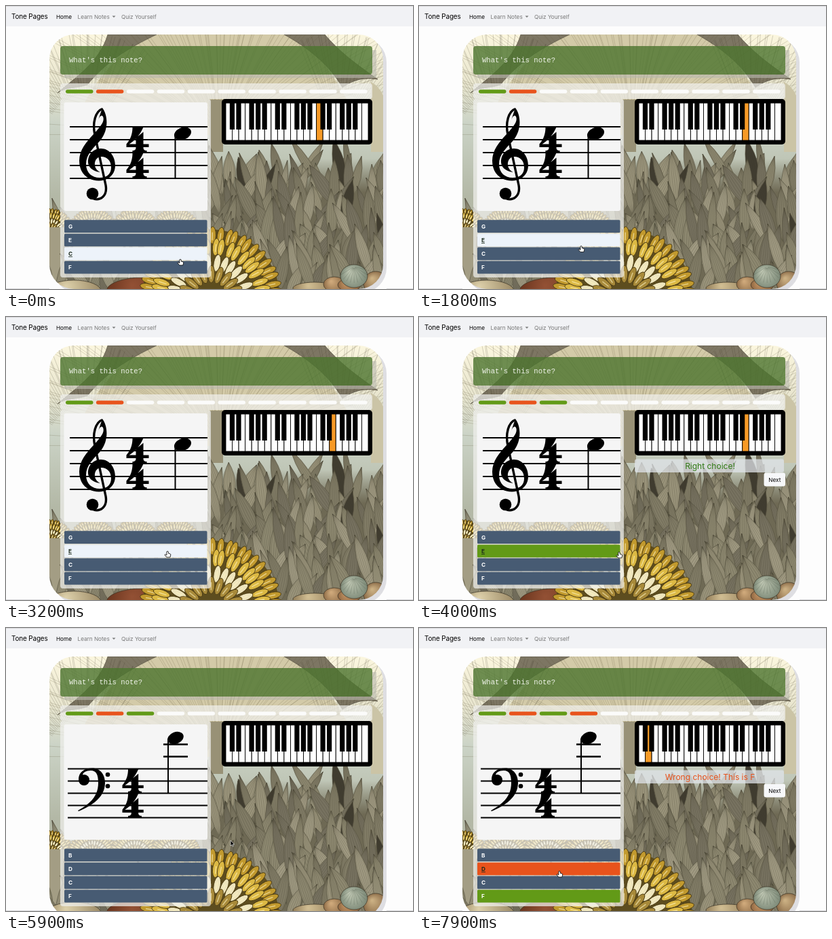
An HTML page with a canvas for the animation above (8 s loop, 600 px wide and 417 px high).

```html
<!DOCTYPE html>
<html lang="en">
<head>
<meta charset="utf-8">
<title>Note quiz</title>
<style>
  html, body { margin: 0; width: 100%; height: 100%; overflow: hidden; background: #fdfdfd; }
  #stage { position: absolute; left: 0; top: 0; width: 600px; height: 417px; overflow: hidden; }
  #card { position: absolute; left: 64px; top: 42px; width: 492px; border-radius: 36px; overflow: hidden; }
  #shade { position: absolute; left: 69px; top: 47px; width: 492px; border-radius: 36px; background: #dedee2; }
  #art { position: absolute; left: 0; top: 0; }
  svg { position: absolute; left: 0; top: 0; }
  text { font: 8.2px Inter, Roboto, sans-serif; }
  .brand { font-size: 9.9px; letter-spacing: -.12px; }
  .muted { fill: #777; }
  .prompt { font: 10.6px "Liberation Mono", monospace; fill: #eef2e8; }
  .verdict { font-size: 12px; text-anchor: middle; }
  .row text { font-weight: 700; fill: #fff; }
  .row.hover text { fill: #1c2a1c; text-decoration: underline; }
  .ink { fill: none; stroke: #000; }
</style>
</head>
<body>
<div id="stage">
  <div id="shade"></div>
  <div id="card"><canvas id="art" width="492" height="390"></canvas></div>
  <svg width="600" height="417" viewBox="0 0 600 417">
    <defs>
      <path id="four" d="M9 0H25C20 12 12 20 4 25H14V16L25 7V25H33V29.500H25C25 33 26 34.500 30 34.500V37.500H9V34.500C13 34.500 14 33 14 29.500H0V25C6 18 9 10 9 0Z"/>
    </defs>
    <rect width="600" height="30" fill="#f1f2f5"/>
    <path d="M0 .5H600M0 416.5H64M561 416.5H600" stroke="#d9d9dc"/>
    <text class="brand" x="8" y="19">Tone Pages</text>
    <text x="74" y="18.5">Home</text>
    <text class="muted" x="105.5" y="18.5">Learn Notes</text>
    <path class="muted" d="M156.500 14.500h5l-2.500 2.500z"/>
    <text class="muted" x="170" y="18.500">Quiz Yourself</text>

    <path d="M540 65H546V106H86V101H540Z" fill="#b9b9ae" fill-opacity=".6"/>
    <rect x="80" y="59" width="460" height="42" rx="4" fill="#4d752f" fill-opacity=".8"/>
    <text class="prompt" x="93" y="83">What's this note?</text>
    <rect x="80" y="114" width="460" height="23" rx="4" fill="#f1f1ee" fill-opacity=".7"/>
    <g id="bars"></g>

    <rect id="panel" x="80" y="137" width="222" height="263" rx="4" fill="#f0f0ee" fill-opacity=".72"/>
    <rect id="sheet" x="85.500" y="142" width="211.500" height="160" rx="3" fill="#f5f5f5"/>
    <g id="treble">
      <path class="ink" stroke-width="2" d="M94 178H297M94 197H297M94 216H297M94 235H297M94 254H297M249.500 188V254"/>
      <path d="M142 150C151 162 151 184 139 198C128 210 118 219 118 233C118 246 127 253 138 253C149 253 155 247 155 238C155 227 148 222 141 222C134 222 130 228 131 235C132 240 135 243 139 245C126 243 120 236 121 227C122 217 130 210 140 210C152 210 161 221 161 235C161 249 150 257.500 137 257.500C120 257.500 108 246 108 228C108 212 119 200 128 190C139 178 146 170 143 163C141 160 138 162 136 168Z"/>
      <path class="ink" stroke-width="3.400" d="M142 151.500C132 155 127 172 131 190L147 264C150 281 138 287 129 284"/>
      <circle cx="127.500" cy="276.500" r="8.800"/>
      <use href="#four" x="177.500" y="178.500"/><use href="#four" x="177.500" y="216.500"/>
      <ellipse cx="260.500" cy="188" rx="13" ry="9" transform="rotate(-22 260.500 188)"/>
    </g>
    <g id="bass">
      <path class="ink" stroke-width="2" d="M91 207.500H297M91 225.500H297M91 243.500H297M91 261.500H297M91 279.500H297M239 163V243"/>
      <path class="ink" stroke-width="2.600" d="M232 171.500H268M232 189.500H268"/>
      <path d="M107 223C107 212 116 206.500 127 206.500C139 206.500 146 216 146 228C146 250 126 262 107 270L106 269C124 259 136 248 136 228C136 216 133 210 125 210C118 210 113 213 113 217Z"/>
      <circle cx="115" cy="224" r="8"/><circle cx="150" cy="216" r="3.300"/><circle cx="150" cy="233" r="3.300"/>
      <g transform="translate(171.500 208) scale(.947)"><use href="#four"/><use href="#four" y="38"/></g>
      <ellipse cx="250" cy="162" rx="12.200" ry="8.600" transform="rotate(-22 250 162)"/>
    </g>
    <g id="rows"></g>

    <rect x="318" y="137" width="222" height="67" rx="5"/>
    <g id="keys"></g>
    <g id="result">
      <rect x="318" y="209.500" width="220" height="19.500" rx="3" fill="#e1e5ea" fill-opacity=".74"/>
      <text id="verdict" class="verdict" x="429" y="223.800"></text>
      <rect x="508.500" y="229.500" width="31.500" height="20" rx="3" fill="#f6f7f9"/>
      <text x="524.300" y="242.500" text-anchor="middle">Next</text>
    </g>
    <g id="pointer">
      <path id="hand" d="M-1.200 .8Q0-.6 1.200 .8V3.200L4 4Q5 4.400 4.600 6L3.800 9H-1.200L-4 5.800Q-4.200 4.400-2.600 5L-1.200 6Z" fill="#fff" stroke="#000" stroke-width=".8"/>
      <path id="arrow" d="M0 0V8L1.900 6.300L3.200 9L4.400 8.400L3.200 5.800H5.600Z" stroke="#fff" stroke-width=".6"/>
    </g>
  </svg>
</div>
<script>
const $ = id => document.getElementById(id);
const GREEN = '#629a17', RED = '#e8531c', SLATE = '#475b73', PALE = '#edf3fa';

/* ---- engraved garden behind the quiz ---- */
let seed = 41;
const rnd = (lo, hi) => {
  seed = (seed * 16807) % 2147483647;
  return lo + (hi - lo) * seed / 2147483647;
};
const pick = list => list[Math.floor(rnd(0, list.length))];
const ctx = $('art').getContext('2d');
ctx.translate(-64, -42);

function shape(d, fill, line) {
  const path = new Path2D(d);
  ctx.fillStyle = fill;
  ctx.fill(path);
  if (line) { ctx.strokeStyle = line; ctx.lineWidth = .6; ctx.stroke(path); }
}

function leaf(x, y, len, w, tilt, fill) {
  ctx.save();
  ctx.translate(x, y);
  ctx.rotate(tilt);
  shape(`M0 0Q${w} ${-len * .45} 0 ${-len}Q${-w} ${-len * .45} 0 0Z`, fill, '#55513f');
  ctx.lineWidth = .4;
  ctx.strokeStyle = 'rgba(60,56,42,.5)';
  ctx.beginPath();
  for (let k = -2; k <= 2; k++) {
    ctx.moveTo(0, -2);
    ctx.quadraticCurveTo(k * w * .38, -len * .45, 0, -len);
  }
  ctx.stroke();
  ctx.restore();
}

function veins(cx, cy, from, to, r0, r1, step, color) {
  ctx.strokeStyle = color;
  ctx.lineWidth = .5;
  ctx.beginPath();
  for (let a = from; a < to; a += step) {
    const bend = a + rnd(-.04, .04);
    ctx.moveTo(cx + r0 * Math.cos(a), cy + r0 * Math.sin(a));
    ctx.lineTo(cx + r1 * Math.cos(bend), cy + r1 * Math.sin(bend));
  }
  ctx.stroke();
}

function cornFan(cx, cy, radius) {
  ctx.beginPath();
  ctx.arc(cx, cy, radius * .96, 0, 7);
  ctx.fillStyle = '#5d4d1f';
  ctx.fill();
  const rings = [[.88, '#c29a2e'], [.72, '#dcb944'], [.5, '#eee5bd'], [.34, '#a88a3a']];
  for (const [at, fill] of rings) {
    for (let a = -3.1; a < .1; a += .105 / at) {
      ctx.save();
      ctx.translate(cx, cy);
      ctx.rotate(a + rnd(-.03, .03));
      ctx.beginPath();
      ctx.ellipse(radius * at, 0, radius * .12, radius * .047, 0, 0, 7);
      ctx.fillStyle = fill;
      ctx.fill();
      ctx.strokeStyle = '#4d3d14';
      ctx.lineWidth = .9;
      ctx.stroke();
      ctx.fillStyle = 'rgba(255,245,195,.6)';
      ctx.fillRect(radius * (at - .07), -1, radius * .11, 1.5);
      ctx.restore();
    }
  }
}

function ball(x, y, rx, ry, fill, glow) {
  const g = ctx.createRadialGradient(x - rx * .3, y - ry * .4, 1, x, y, rx);
  g.addColorStop(0, glow);
  g.addColorStop(1, fill);
  ctx.beginPath();
  ctx.ellipse(x, y, rx, ry, 0, 0, 7);
  ctx.fillStyle = g;
  ctx.fill();
  ctx.strokeStyle = '#3c3426';
  ctx.lineWidth = .7;
  ctx.stroke();
}

function paintGarden() {
  const sky = ctx.createLinearGradient(0, 42, 0, 280);
  [[0, '#fbf6de'], [.3, '#e9e6cf'], [.55, '#cbd3c6'], [1, '#b3b8a6']].forEach(s => sky.addColorStop(...s));
  ctx.fillStyle = sky;
  ctx.fillRect(64, 42, 492, 390);

  // great leaf with its two folded dark edges
  shape('M100 190C108 130 164 72 206 42H432C474 84 500 130 530 190Z', '#d3caa8');
  shape('M150 42H222C180 62 148 82 120 116C104 122 90 118 76 128C104 104 138 82 150 42Z', '#7d7663', '#4c4739');
  shape('M410 42H470C490 66 515 85 548 108C522 104 508 112 496 120C476 86 446 62 410 42Z', '#7d7663', '#4c4739');
  veins(315, 190, -3.1, -.05, 20, 300, .03, 'rgba(95,86,60,.42)');
  veins(120, 190, -2.6, -.9, 60, 150, .04, 'rgba(60,55,42,.4)');
  veins(490, 190, -2, -.6, 60, 150, .04, 'rgba(60,55,42,.4)');
  shape('M538 112Q550 118 556 132V215H538Z', '#cbc4a6');
  shape('M300 138H320V215H300Z', '#989176');

  // field of blades, back rows first
  const field = ctx.createLinearGradient(0, 225, 0, 275);
  field.addColorStop(0, 'rgba(110,105,84,0)');
  field.addColorStop(1, '#6e6954');
  ctx.fillStyle = field;
  ctx.fillRect(300, 225, 256, 207);
  const greys = ['#8d8870', '#9a947b', '#817c66', '#a09a82', '#777260'];
  const withShadow = [...greys, ...greys, '#403c30'];
  for (let row = 0; row < 9; row++) {
    for (let x = 292; x < 566; x += 15) {
      leaf(x + rnd(-7, 7), 268 + row * 20 + rnd(-9, 9), rnd(50, 88), rnd(10, 20), rnd(-.6, .6), pick(withShadow));
    }
  }

  // lower left, mostly veiled by the answers
  for (let x = 62; x < 302; x += 12) {
    leaf(x, 345 + rnd(-10, 6), rnd(40, 85), 10, rnd(-.5, .5), pick(['#b5b49c', '#c3c1a8', '#9d9a82']));
  }
  for (const x of [64, 128, 190, 250]) cornFan(x, 336, 38);
  ctx.fillStyle = '#a39d84';
  ctx.fillRect(64, 326, 238, 106);
  for (let x = 62; x < 302; x += 10) leaf(x, 430, rnd(50, 100), 14, rnd(-.7, .7), pick(greys));

  // harvest along the ground
  ball(100, 420, 40, 16, '#9c8a66', '#ddd0aa');
  ball(202, 420, 54, 20, '#6a351e', '#925034');
  ball(252, 416, 16, 12, '#777055', '#ded8bd');
  ball(278, 416, 18, 13, '#8a8268', '#e4dfc8');
  cornFan(302, 431, 106);
  ball(455, 416, 32, 9, '#937e59', '#d0bd92');
  ball(484, 410, 16, 11, '#8c6a45', '#cfa97b');
  ball(545, 408, 18, 17, '#8a6a47', '#cbb083');
  ball(506, 411, 17, 9, '#8d643f', '#c39565');
  ball(513, 398, 20, 17, '#7b8876', '#c0c8b4');
  veins(513, 384, .3, 2.8, 2, 24, .25, 'rgba(50,60,45,.4)');
}
paintGarden();

/* ---- quiz widgets ---- */
function add(parent, tag, attrs) {
  const el = document.createElementNS('http://www.w3.org/2000/svg', tag);
  for (const k in attrs) el.setAttribute(k, attrs[k]);
  return parent.appendChild(el);
}

const bars = Array.from({ length: 10 }, (_, i) =>
  add($('bars'), 'rect', { x: 88 + i * 44.9, y: 123.2, width: 40.5, height: 5.6, rx: 2.8 }));

const ROW_STEP = 20.15;
const rows = Array.from({ length: 4 }, (_, i) => {
  const g = add($('rows'), 'g', { class: 'row' });
  const y = 315.3 + i * ROW_STEP;
  return {
    g,
    box: add(g, 'rect', { x: 86, y, width: 210.5, height: 18.8, rx: 1.5 }),
    label: add(g, 'text', { x: 92, y: y + 12.6 })
  };
});

const KEY_W = 210 / 22;
const keys = Array.from({ length: 22 }, (_, i) =>
  add($('keys'), 'rect', { x: 324 + i * KEY_W, y: 143, width: KEY_W, height: 55, stroke: '#000', 'stroke-width': .9 }));
for (let i = 0; i < 21; i++) {
  if ([0, 1, 3, 4, 5].includes(i % 7)) {
    add($('keys'), 'rect', { x: 320.3 + (i + 1) * KEY_W, y: 142.5, width: 7.2, height: 39.5 });
  }
}

/* ---- timeline ---- */
const LOOP = 8000, RIGHT_AT = 3400, NEXT_AT = 5200, WRONG_AT = 7450;
const questions = [
  { clef: 'treble', notes: 'GECF', keys: [18, 16, 14, 17], grow: 0, answer: 1, chosen: 1, at: RIGHT_AT,
    done: [GREEN, RED], verdict: 'Right choice!', tone: '#2f7a14' },
  { clef: 'bass', notes: 'BDCF', keys: [6, 1, 0, 3], grow: 10, answer: 3, chosen: 1, at: WRONG_AT,
    done: [GREEN, RED, GREEN], verdict: 'Wrong choice! This is F', tone: RED }
];
// time, x, y of the pointer tip
const trail = [
  [0, 257, 373], [400, 258, 371], [900, 256, 348], [1500, 255, 348], [2300, 205, 365], [2700, 206, 365],
  [3150, 238, 345], [3500, 240, 345], [4000, 295, 346], [4150, 295, 346], [4900, 522, 238], [5300, 522, 238],
  [5850, 331, 313], [6000, 331, 313], [6600, 208, 358], [8000, 207, 358]
];

function pointerAt(t) {
  const i = trail.findIndex(p => p[0] > t);
  const [t0, x0, y0] = trail[i - 1], [t1, x1, y1] = trail[i];
  const u = (t - t0) / (t1 - t0), e = u * u * (3 - 2 * u);
  return [x0 + (x1 - x0) * e, y0 + (y1 - y0) * e];
}

const show = (id, on) => { $(id).style.display = on ? '' : 'none'; };

function render(t) {
  const q = questions[t < NEXT_AT ? 0 : 1];
  const answered = t >= q.at;
  const [x, y] = pointerAt(t);
  const slot = Math.floor((y - q.grow - 314.7) / ROW_STEP);
  const hover = x >= 86 && x <= 296.5 && slot >= 0 && slot < 4 ? slot : -1;
  const onNext = answered && x > 508 && x < 540 && y > 229 && y < 250;

  for (const id of ['card', 'shade']) $(id).style.height = 375 + q.grow + 'px';
  $('panel').setAttribute('height', 263 + q.grow);
  $('sheet').setAttribute('height', 160 + q.grow);
  $('rows').setAttribute('transform', `translate(0 ${q.grow})`);
  show('treble', q.clef === 'treble');
  show('bass', q.clef === 'bass');

  rows.forEach((row, i) => {
    let fill = i === hover && !answered ? PALE : SLATE;
    if (answered && i === q.chosen) fill = RED;
    if (answered && i === q.answer) fill = GREEN;
    row.box.setAttribute('fill', fill);
    row.label.textContent = q.notes[i];
    row.g.classList.toggle('hover', i === hover);
  });
  keys.forEach((key, i) => key.setAttribute('fill', hover >= 0 && q.keys[hover] === i ? '#f79a26' : '#fff'));

  const marks = answered ? [...q.done, q.chosen === q.answer ? GREEN : RED] : q.done;
  bars.forEach((bar, i) => bar.setAttribute('fill', marks[i] || '#fbfbfa'));

  show('result', answered);
  $('verdict').textContent = q.verdict;
  $('verdict').setAttribute('fill', q.tone);
  show('hand', hover >= 0 || onNext);
  show('arrow', hover < 0 && !onNext);
  $('pointer').setAttribute('transform', `translate(${x} ${y})`);
}

const start = performance.now();
function tick() {
  render((performance.now() - start) % LOOP);
  requestAnimationFrame(tick);
}
tick();
</script>
</body>
</html>
```
